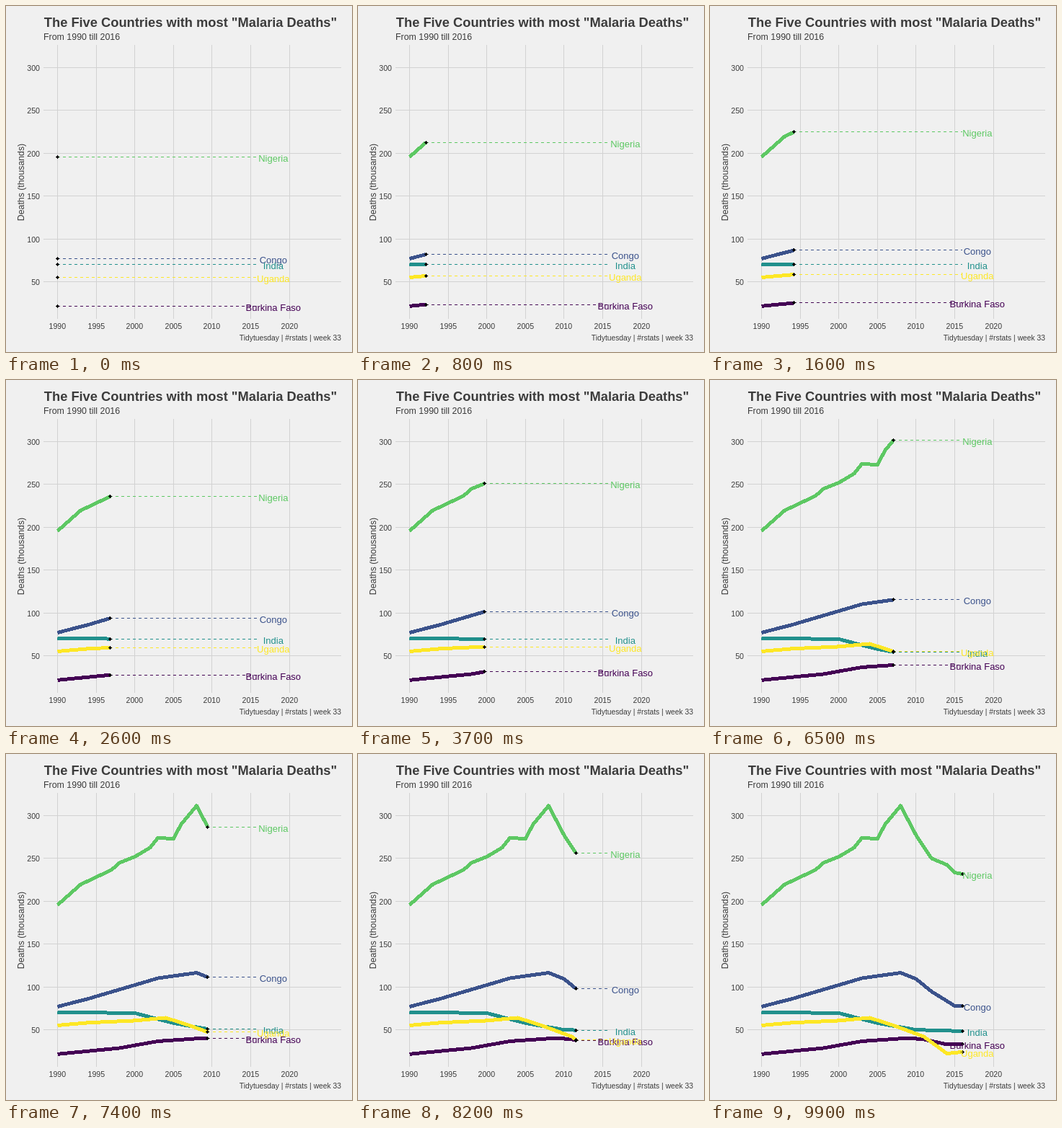
Write an HTML page that moves like this. It is 480 by 480 pixels and loops after 10000 ms.

```html
<!DOCTYPE html>
<html lang="en">
<head>
<meta charset="utf-8">
<title>Malaria deaths</title>
<style>
  html, body { margin: 0; width: 100%; height: 100%; overflow: hidden; background: #f0f0f0; }
  svg { display: block; width: 480px; height: 480px; }
  text { font-family: "Liberation Sans", Arial, sans-serif; fill: #3c3c3c; }
  .title { font-size: 18.3px; font-weight: bold; }
  .sub { font-size: 12.4px; }
  .axis { font-size: 12.3px; text-anchor: middle; }
  .tick { font-size: 10.6px; }
  .caption { font-size: 10.3px; text-anchor: end; }
  .name { font-size: 13px; text-anchor: middle; }
  .grid, .line, .dash, .dot { shape-rendering: crispEdges; }
  .grid { stroke: #d2d2d2; }
  .line { fill: none; stroke-width: 5; stroke-linejoin: round; }
  .dash { stroke-dasharray: 4 4; }
</style>
</head>
<body>
<svg id="stage" viewBox="0 0 480 480">
  <text class="title" x="52.8" y="29">The Five Countries with most "Malaria Deaths"</text>
  <text class="sub" x="52" y="47">From 1990 till 2016</text>
  <text class="axis" transform="translate(25 244.5) rotate(-90)">Deaths (thousands)</text>
  <text class="caption" x="465" y="464">Tidytuesday | #rstats | week 33</text>
</svg>
<script>
const STEP = 100, STEPS = 100;
const FIRST = 1990, SPAN = 26;
const stage = document.getElementById('stage');

// Turning points: [years since 1990, deaths in thousands].
const countries = [
  { name: 'Burkina Faso', color: '#440154', path: [
    [0, 22], [8, 29], [13, 37], [19, 40.7], [21, 39.2], [24, 33.2], [26, 33.4]] },
  { name: 'Congo', color: '#3b528b', path: [
    [0, 77.3], [4, 86.6], [10, 102.5], [13, 110.5], [18, 116.8],
    [20, 109.7], [22, 95], [25, 78.2], [26, 78.2]] },
  { name: 'India', color: '#21908c', path: [
    [0, 70.8], [10, 69.8], [15, 58.1], [20, 50.3], [26, 48.8]] },
  { name: 'Nigeria', color: '#5dc863', path: [
    [0, 195.8], [3, 219.8], [7, 236.8], [8, 245], [10, 252.1],
    [12, 262.8], [13, 274.2], [15, 272.9], [16, 289.9], [18, 311.5],
    [20, 277.3], [22, 250.2], [24, 242.6], [25, 233.6], [26, 231.9]] },
  { name: 'Uganda', color: '#fde725', path: [
    [0, 55.5], [4, 58.6], [10, 61], [14, 64.3], [17, 55.7],
    [21, 42.4], [24, 22.7], [26, 24.4]] },
];

const xOf = age => 71 + age * 10.717;
const yOf = deaths => 85 + (300 - deaths) * 1.19;

function deathsAt(path, age) {
  const i = Math.max(1, path.findIndex(([a]) => a >= age));
  const [a0, d0] = path[i - 1], [a1, d1] = path[i];
  return d0 + (d1 - d0) * (age - a0) / (a1 - a0);
}

function set(el, attrs) {
  for (const key in attrs) el.setAttribute(key, attrs[key]);
}

function add(parent, tag, attrs, text = '') {
  const el = document.createElementNS('http://www.w3.org/2000/svg', tag);
  set(el, attrs);
  el.textContent = text;
  return parent.appendChild(el);
}

// Shifted so that whole numbers fall on pixel centres.
const layer = () => add(stage, 'g', { transform: 'translate(.5 .5)' });

const grid = layer();
for (let deaths = 50; deaths <= 300; deaths += 50) {
  const y = Math.floor(yOf(deaths));
  add(grid, 'line', { class: 'grid', x1: 51.5, x2: 464.5, y1: y, y2: y });
  add(stage, 'text', { class: 'tick', x: 47, y: y + 5, 'text-anchor': 'end' }, deaths);
}
for (let age = 0; age <= 30; age += 5) {
  const x = Math.round(xOf(age));
  add(grid, 'line', { class: 'grid', x1: x, x2: x, y1: 53.5, y2: 433.5 });
  add(stage, 'text', { class: 'tick', x: x + 0.3, y: 448, 'text-anchor': 'middle' }, FIRST + age);
}

const lines = layer(), dashes = layer(), dots = layer(), names = layer();
const parts = countries.map(({ name, color, path }) => ({
  path,
  line: add(lines, 'polyline', { class: 'line', stroke: color }),
  dash: add(dashes, 'line', { class: 'dash', stroke: color, x2: xOf(SPAN) }),
  dot: add(dots, 'circle', { class: 'dot', r: 2.2 }),
  label: add(names, 'text', { class: 'name', x: 370.3, style: `fill:${color}` }, name),
}));

function draw(step) {
  const age = SPAN * step / (STEPS - 1);
  const x = Math.round(xOf(age));
  for (const { path, line, dash, dot, label } of parts) {
    const deaths = deathsAt(path, age);
    const y = Math.round(yOf(deaths));
    const trail = [...path.filter(([a]) => a < age), [age, deaths]];
    set(line, { points: trail.map(([a, d]) => `${xOf(a)},${yOf(d)}`).join(' ') });
    set(dash, { x1: x - 0.5, y1: y, y2: y });
    set(dot, { cx: x, cy: y });
    set(label, { y: y + 6.5 });
  }
}

const start = performance.now();
let shown = -1;
function tick() {
  const step = Math.floor((performance.now() - start) / STEP) % STEPS;
  if (step !== shown) draw(shown = step);
  requestAnimationFrame(tick);
}
tick();
</script>
</body>
</html>
```
